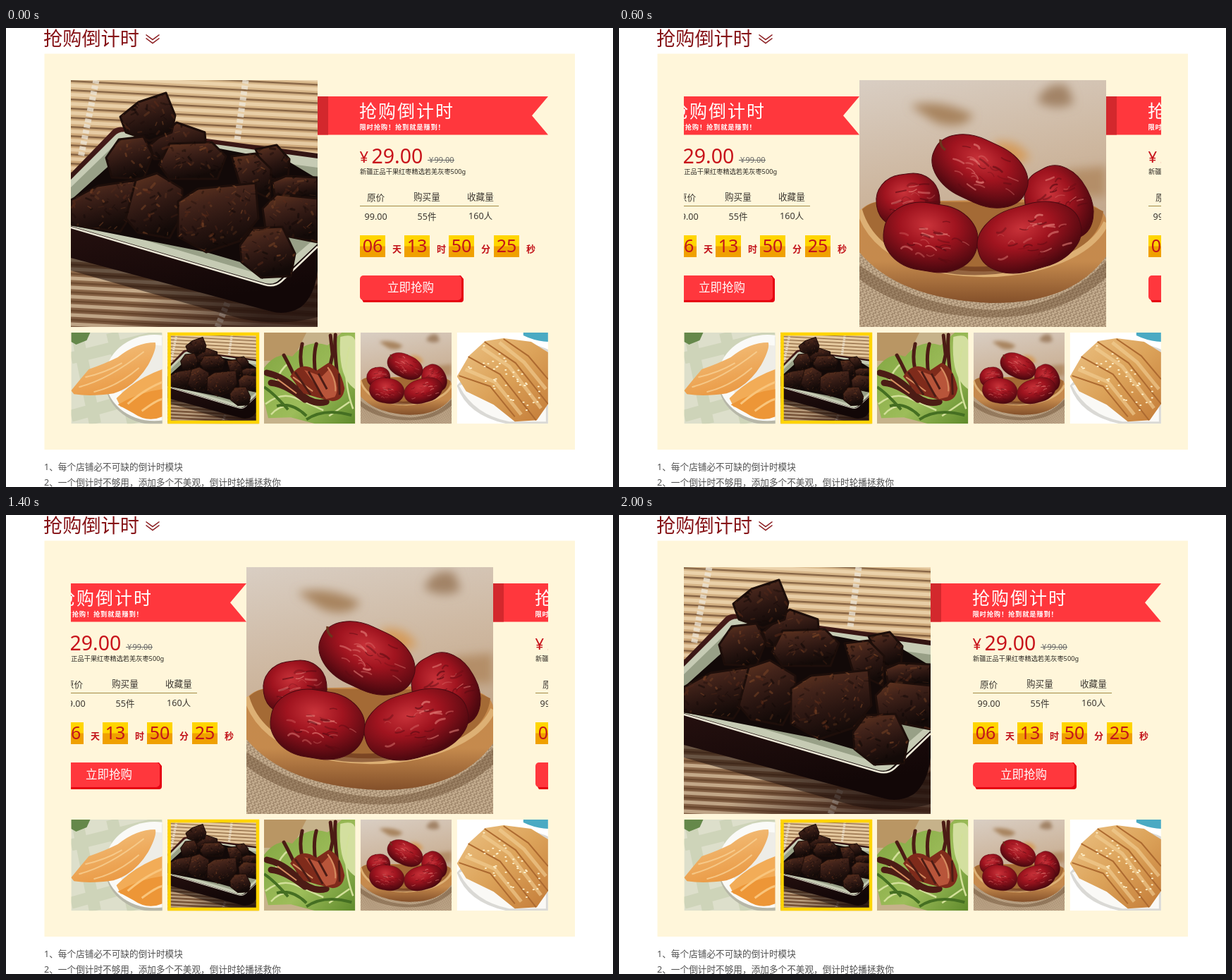
An HTML page for the animation above (2200 ms loop, 861 by 651 pixels).

```html
<!DOCTYPE html>
<html lang="zh-CN">
<head>
<meta charset="utf-8">
<title>抢购倒计时</title>
<style>
  html, body { margin: 0; width: 100%; height: 100%; overflow: hidden; background: #fff; }
  svg { display: block; }
  text { font-family: "Noto Sans", "Noto Sans CJK SC", sans-serif; }
  .cell { font-size: 12.6px; fill: #3b3731; }
  .unit { font-size: 13px; font-weight: 700; fill: #c3141b; }
  .digits { font-size: 25px; font-weight: 500; fill: #c3141b; text-anchor: middle; }
  .slogan { font: 700 9.3px "Noto Sans CJK TC", sans-serif; letter-spacing: .8px; fill: #fff; }
  .note { font-size: 12.65px; fill: #505050; }
</style>
</head>
<body>
<svg id="stage" width="861" height="651" viewBox="0 0 861 651">
  <defs>
    <clipPath id="window"><rect x="92" y="74" width="677" height="350"/></clipPath>
    <linearGradient id="mat" x2="0" y2="1">
      <stop offset="0" stop-color="#d9b98c"/><stop offset=".4" stop-color="#c79f70"/>
      <stop offset=".7" stop-color="#94704e"/><stop offset="1" stop-color="#7d5a40"/>
    </linearGradient>
    <linearGradient id="shade" x2="1" y2=".5">
      <stop offset=".5" stop-color="#2b1510" stop-opacity="0"/><stop offset="1" stop-color="#2b1510" stop-opacity=".75"/>
    </linearGradient>
    <linearGradient id="chunk" x2=".35" y2="1">
      <stop offset="0" stop-color="#673820"/><stop offset=".35" stop-color="#42231a"/>
      <stop offset=".7" stop-color="#271410"/><stop offset="1" stop-color="#130a08"/>
    </linearGradient>
    <linearGradient id="glaze" x2=".2" y2="1">
      <stop offset="0" stop-color="#4b1d1a"/><stop offset=".5" stop-color="#25100f"/><stop offset="1" stop-color="#120707"/>
    </linearGradient>
    <pattern id="slats" width="350" height="13" patternUnits="userSpaceOnUse" patternTransform="rotate(3)">
      <rect width="350" height="2.5" fill="#5d3b22" opacity=".65"/><rect y="5" width="350" height="5" fill="#fdebca" opacity=".5"/>
    </pattern>
    <linearGradient id="table" x2=".2" y2="1">
      <stop offset="0" stop-color="#d9cec3"/><stop offset=".45" stop-color="#cdb69e"/><stop offset="1" stop-color="#b7997a"/>
    </linearGradient>
    <pattern id="weave" width="6" height="6" patternUnits="userSpaceOnUse" patternTransform="rotate(28)">
      <rect width="6" height="6" fill="#b1987b"/><path d="M0 1H4M2 4H6" stroke="#cdb798" stroke-width="1.6"/>
      <path d="M5 0V3M1 3V6" stroke="#8e755a"/>
    </pattern>
    <linearGradient id="wood" x2="0" y2="1">
      <stop offset="0" stop-color="#c68a4c"/><stop offset=".6" stop-color="#c58a4d"/><stop offset="1" stop-color="#84502a"/>
    </linearGradient>
    <radialGradient id="date" cx=".45" cy=".33" r=".66">
      <stop offset="0" stop-color="#c9333a"/><stop offset=".45" stop-color="#a0141f"/><stop offset="1" stop-color="#4d080f"/>
    </radialGradient>
    <linearGradient id="mango" x2=".4" y2="1">
      <stop offset="0" stop-color="#f4c584"/><stop offset="1" stop-color="#ea9a45"/>
    </linearGradient>
    <linearGradient id="crisp" x2="1" y2="1">
      <stop offset="0" stop-color="#ecc284"/><stop offset=".5" stop-color="#dca35a"/><stop offset="1" stop-color="#c47c38"/>
    </linearGradient>
    <linearGradient id="leaf" x2="1" y2="1">
      <stop offset="0" stop-color="#7fa33f"/><stop offset=".6" stop-color="#9dbd5a"/><stop offset="1" stop-color="#5f8a2b"/>
    </linearGradient>
    <filter id="soft"><feGaussianBlur stdDeviation="7"/></filter>

    <symbol id="meat" viewBox="0 0 350 350">
      <rect width="350" height="350" fill="url(#mat)"/>
      <rect width="350" height="350" fill="url(#slats)"/>
      <path d="M36 0L14 110M248 0L236 85M222 316L208 350" stroke="#efe8da" stroke-width="9" stroke-dasharray="5 3" opacity=".75"/>
      <rect y="210" width="350" height="140" fill="url(#shade)"/>
      <path d="M0 236L284 328L350 290V336Q300 350 240 338L0 270Z" fill="#1c0d0a" opacity=".55"/>
      <path d="M0 132L60 70Q68 64 80 68L350 104V270Q346 306 326 322Q306 334 284 328L0 252Z" fill="url(#glaze)"/>
      <path d="M0 141L62 79Q69 71 82 74L350 111V232L296 283Q288 291 276 288L0 207Z" fill="#c6cbb4"/>
      <path d="M0 152L68 86L350 124V221L288 275Q283 279 274 277L0 196Z" fill="#98a087"/>
      <path d="M0 209L275 290Q289 294 299 285L350 236" fill="none" stroke="#ece8d7" stroke-width="2.5"/>
      <path d="M60 116L112 78L310 116L350 140V215L308 222L272 282L240 258L192 244L0 206V170Z" fill="#120908"/>
      <g id="chunks" fill="url(#chunk)" stroke="#1d0e0a" stroke-width="3" stroke-linejoin="round"></g>
      <g clip-path="url(#chunkClip)" id="crumbs" fill="none" stroke-linecap="round"></g>
    </symbol>

    <symbol id="dates" viewBox="0 0 350 350">
      <rect width="350" height="350" fill="url(#table)"/>
      <g filter="url(#soft)">
        <path d="M72 36Q115 25 162 50Q145 72 108 60Z" fill="#a8845f"/>
        <path d="M252 30Q265 0 295 8L304 32Q280 46 252 30Z" fill="#a28366"/>
        <path d="M190 88Q228 82 242 112L200 126Z" fill="#d49b5c"/>
        <path d="M290 128L350 122V165H300Z" fill="#b48e67"/>
      </g>
      <path d="M0 228Q40 285 170 300Q300 290 350 232V350H0Z" fill="url(#weave)"/>
      <path d="M0 262Q80 322 190 326Q290 322 350 256V280Q280 342 170 336Q60 330 0 282Z" fill="#5f4227" opacity=".4"/>
      <path d="M0 186Q18 166 60 172L300 168Q350 178 350 200V250Q300 318 185 316Q55 310 0 244Z" fill="url(#wood)"/>
      <path d="M0 188Q14 170 40 172L320 174L346 186Q340 240 250 265Q170 284 90 261Q15 240 0 188Z" fill="#a46a35"/>
      <path d="M0 184Q16 240 90 264Q170 285 250 267Q330 246 350 202" fill="none" stroke="#ddb074" stroke-width="8"/>
      <path d="M70 252Q165 292 285 246" fill="none" stroke="#5b2917" stroke-width="12" opacity=".55"/>
      <g id="fruit"></g>
      <path d="M122 99Q114 94 115 84" fill="none" stroke="#6b351d" stroke-width="3.5"/>
    </symbol>

    <symbol id="mangoes" viewBox="0 0 129 129">
      <rect width="129" height="129" fill="#dddfcb"/>
      <path d="M0 36L129 4M0 118L100 90M8 0L34 129M58 0L88 129" stroke="#bac49f" stroke-width="17" opacity=".4"/>
      <path d="M0 0H27L22 11L7 17L0 13Z" fill="#65884a"/>
      <ellipse cx="118" cy="68" rx="70" ry="62" fill="#b7b7a8"/>
      <ellipse cx="118" cy="64" rx="70" ry="61" fill="#fafaf7"/>
      <ellipse cx="122" cy="66" rx="55" ry="48" fill="#eeede7"/>
      <path d="M64 93Q90 66 129 52V92Q98 108 70 105Z" fill="#f2ac57"/>
      <path d="M66 102Q96 84 129 80V119Q108 128 88 114Z" fill="#ed9637"/>
      <path d="M80 101Q104 80 129 70M100 111Q120 96 129 94" fill="none" stroke="#f9c57c" stroke-width="3"/>
      <path d="M0 82L13 66L25 52Q48 44 66 35Q92 14 119 14Q122 22 109 46Q90 77 60 86Q28 91 4 87Z" fill="url(#mango)"/>
      <path d="M11 77Q52 67 103 27M20 63Q48 57 72 43M32 84Q66 76 96 50" fill="none" stroke="#fad69c" stroke-width="2" opacity=".7"/>
    </symbol>

    <symbol id="duck" viewBox="0 0 129 129">
      <rect width="129" height="129" fill="#c6b28a"/>
      <path d="M0 0H60L40 40H0Z" fill="#b99664"/>
      <path d="M0 50Q18 26 40 34Q60 8 90 18L110 0H129V129H72L38 120L6 121L0 96Z" fill="url(#leaf)"/>
      <path d="M108 6Q129 0 129 14V80Q104 64 108 6Z" fill="#d3df9f"/>
      <path d="M2 101Q24 84 43 92T84 110M10 116Q28 95 54 111M121 20Q109 61 126 108M16 70Q24 51 34 44M92 118L121 98" fill="none" stroke="#d3e09a" stroke-width="2.5"/>
      <path d="M0 77Q14 86 34 109M60 123Q85 106 124 117M18 104Q40 98 60 118" fill="none" stroke="#456f22" stroke-width="4"/>
      <g fill="none" stroke="#4c1c15" stroke-linecap="round">
        <path d="M4 57Q28 62 48 83T88 98M10 71Q30 73 58 95" stroke-width="9"/>
        <path d="M49 75Q37 48 28 32M58 65Q48 40 54 16M73 60Q69 34 74 16M91 59L97 31L94 4M105 70Q99 26 101 3" stroke-width="5"/>
      </g>
      <path d="M37 62Q52 38 74 54L91 43Q108 48 114 79Q112 96 97 97L76 92L56 86Z" fill="#7f2b1b"/>
      <path d="M57 53L74 76L88 94L100 91Q109 78 93 51L82 62Z" fill="#b8553a"/>
      <path d="M41 63L69 83M90 49Q102 65 101 83M19 66L46 86" fill="none" stroke="#d58d60" stroke-width="2"/>
      <path d="M63 55L83 91M77 58L89 80M44 56L66 88M106 58L107 88" stroke="#4c1c15" stroke-width="3"/>
    </symbol>

    <symbol id="strips" viewBox="0 0 129 129">
      <rect width="129" height="129" fill="#fff"/>
      <path d="M94 0H129V13Q110 12 94 4Z" fill="#4aaac3"/>
      <path d="M0 75Q14 117 70 129H129V24Q94 8 55 12Z" fill="#dad9d5"/>
      <path d="M3 75Q24 116 74 126H126V32Z" fill="#faf9f6"/>
      <path d="M0 62L17 33L40 12L66 8L105 13L129 28V101L113 124L82 126L52 102L13 83Z" fill="url(#crisp)"/>
      <path d="M16 34L61 59L112 124M39 13L83 43L129 101M66 9L101 33L129 66M3 61L47 76L82 119" fill="none" stroke="#ad6a30" stroke-width="2"/>
      <path d="M12 52L54 70L91 116M36 22L74 48L119 107M60 14L95 42L126 80" fill="none" stroke="#f3d096" stroke-width="5" opacity=".6"/>
      <g id="sesame" fill="#fff1cb"></g>
    </symbol>
  </defs>

  <rect width="861" height="651" fill="#fff"/>
  <text x="53" y="24.500" font-size="27.200" font-weight="300" fill="#861317">抢购倒计时</text>
  <path d="M198.500 9.500L208 16.500L217.500 9.500M198.500 14.500L208 21.500L217.500 14.500" fill="none" stroke="#861317" stroke-width="1.500"/>
  <rect x="54.500" y="36.500" width="752.500" height="561.500" fill="#fff6da"/>

  <g clip-path="url(#window)">
    <g id="track">
      <use href="#meat" x="92" y="74" width="350" height="350"/>
      <g id="offer">
        <path d="M442 97H769L746 124.300L769 151.500H442Z" fill="#ff373d"/>
        <rect x="442" y="97" width="15" height="54.500" fill="#d3282d"/>
        <text x="501" y="126.500" font-size="25" letter-spacing="2" fill="#fff">抢购倒计时</text>
        <text class="slogan" x="501.500" y="143.500">限时抢购！抢到就是赚到！</text>
        <text x="501.500" y="191" font-size="22" fill="#c8141b">¥</text>
        <text x="518.500" y="191.500" font-size="28.500" fill="#c8141b">29.00</text>
        <text x="600" y="191" font-size="11" fill="#666">¥</text>
        <text x="607.500" y="191" font-size="11" fill="#666">99.00</text>
        <path d="M598 187.500H636" stroke="#666"/>
        <text x="502" y="206.800" font-size="9.200" fill="#2b2822">新疆正品干果红枣精选若羌灰枣500g</text>
        <g class="cell">
          <text x="512" y="244.700">原价</text><text x="578" y="244.300">购买量</text><text x="654" y="244.300">收藏量</text>
          <text x="508.500" y="272">99.00</text><text x="583.500" y="272">55件</text><text x="656" y="271.300">160人</text>
        </g>
        <path d="M502 252.500H699" stroke="#a08a45"/>
        <g id="clock"></g>
        <path d="M502 380L507 389H645Q649 389 649 385V356L645 351H640V380Z" fill="#e60012"/>
        <rect x="502" y="351" width="144" height="35" rx="5" fill="#ff373d"/>
        <text x="541" y="374.300" font-size="16.500" fill="#fff">立即抢购</text>
      </g>
      <use href="#dates" x="769" y="74" width="350" height="350"/>
      <use href="#offer" x="677"/>
    </g>
  </g>

  <g id="thumbs"></g>
  <rect id="marker" x="231.500" y="434" width="125.500" height="125" fill="none" stroke="#ffd400" stroke-width="4.500"/>

  <text class="note" x="54" y="626.500">1、每个店铺必不可缺的倒计时模块</text>
  <text class="note" x="54" y="648.500">2、一个倒计时不够用，添加多个不美观，倒计时轮播拯救你</text>
</svg>
<script>
const $ = id => document.getElementById(id);
const fill = (id, items, draw) => { $(id).innerHTML = items.map(draw).join(''); };
const range = n => [...Array(n).keys()];

let seed = 17;
const rand = (lo = 0, hi = 1) => {
  seed = (seed * 16807) % 2147483647;
  return lo + (hi - lo) * seed / 2147483647;
};

const chunks = [
  'M262 98L292 92L310 112L308 140L280 140Z',
  'M228 108L262 104L284 126L282 168L240 148Z',
  'M112 92L150 60L190 74L192 98L150 112L118 112Z',
  'M70 52L96 31L135 18L148 50L143 74L112 86L78 74Z',
  'M50 110L68 84L103 80L116 106L103 140L58 138Z',
  'M125 120L140 90L200 88L220 108L208 140L140 140Z',
  'M286 144L305 136L350 138V168H290Z',
  'M0 170L38 150L92 142L94 178L70 215L0 205Z',
  'M92 142L122 132L158 154V190L140 224L95 216L78 196Z',
  'M272 182L292 162L350 168V230L310 222L276 210Z',
  'M152 172L180 154L262 146L266 196L240 228L192 244L152 222Z',
  'M240 234L258 210L300 208L318 246L312 278L270 280L242 258Z'
];
fill('chunks', chunks, d => `<path d="${d}"/>`);
document.querySelector('defs').insertAdjacentHTML('beforeend',
  `<clipPath id="chunkClip"><path d="${chunks.join('')}"/></clipPath>`);

// Fibrous flecks on the meat
fill('crumbs', range(900), () => {
  const tone = ['#8b4f2a', '#100706', '#5d2c19', '#0d0605'][Math.floor(rand(0, 4))];
  return `<path d="M${rand(0, 350)} ${rand(18, 282)}l${rand(-6, 8)} ${rand(-6, 5)}" stroke="${tone}"
    stroke-width="${rand(.8, 3.4)}" opacity="${rand(.2, .55)}"/>`;
});

// Dates: centre, radii, tilt
const fruit = [
  [69, 171, 45, 38, -8], [283, 176, 45, 55, -28], [171, 129, 71, 44, 25],
  [101, 223, 67, 48, 9], [241, 223, 75, 46, -16]
];
const wrinkle = (rx, ry) => {
  const a = rand(0, 6.28), r = rand(.15, .78);
  const x = Math.cos(a) * rx * r, y = Math.sin(a) * ry * r;
  const light = rand() < .5;
  return `<path d="M${x} ${y}q${rand(3, 7)} ${rand(-7, 5)} ${rand(8, 16)} ${rand(-3, 4)}"
    stroke="${light ? '#ec8d85' : '#5a0a12'}" stroke-width="${rand(1, 3)}" opacity="${rand(.25, .65)}"/>`;
};
fill('fruit', fruit, ([x, y, rx, ry, tilt]) =>
  `<g transform="translate(${x} ${y}) rotate(${tilt})" fill="none" stroke-linecap="round">
    <rect x="${-rx}" y="${-ry}" width="${2 * rx}" height="${2 * ry}" rx="${rx * .85}" ry="${ry * .95}"
      fill="url(#date)" stroke="#4a0910"/>
    ${range(26).map(() => wrinkle(rx, ry)).join('')}</g>`);

fill('sesame', range(48), () => {
  const u = rand(), v = rand(-1, 1);
  return `<ellipse cx="${25 + 87 * u + 15 * v}" cy="${34 + 70 * u - 22 * v}" rx="1.6" ry="1"/>`;
});

fill('clock', [['06', '天'], ['13', '时'], ['50', '分'], ['25', '秒']], ([value, unit], i) => {
  const x = 502 + Math.round(63.2 * i);
  return `<rect x="${x}" y="294" width="36" height="31" fill="#ffd500"/>
    <rect x="${x}" y="309.5" width="36" height="15.5" fill="#f0a000"/>
    <text class="digits" x="${x + 18}" y="318">${value}</text>
    <text class="unit" x="${x + 46}" y="318">${unit}</text>`;
});

fill('thumbs', ['mangoes', 'meat', 'duck', 'dates', 'strips'], (name, i) =>
  `<use href="#${name}" x="${92.4 + 136.8 * i}" y="432" width="129.3" height="129.3"/>`);

// Carousel position and selected thumbnail, one step every 200 ms
const shifts = [0, 145, 290, 428, 571, 677, 571, 428, 290, 145, 0];
const marks = shifts.map((_, i) => i === 4 || i === 5 ? 273.6 : 0);
const play = (id, xs) => $(id).animate(
  [...xs, xs[0]].map(x => ({ transform: `translateX(${x}px)`, easing: 'step-end' })),
  { duration: 200 * xs.length, iterations: Infinity });
play('track', shifts.map(x => -x));
play('marker', marks);
</script>
</body>
</html>
```
